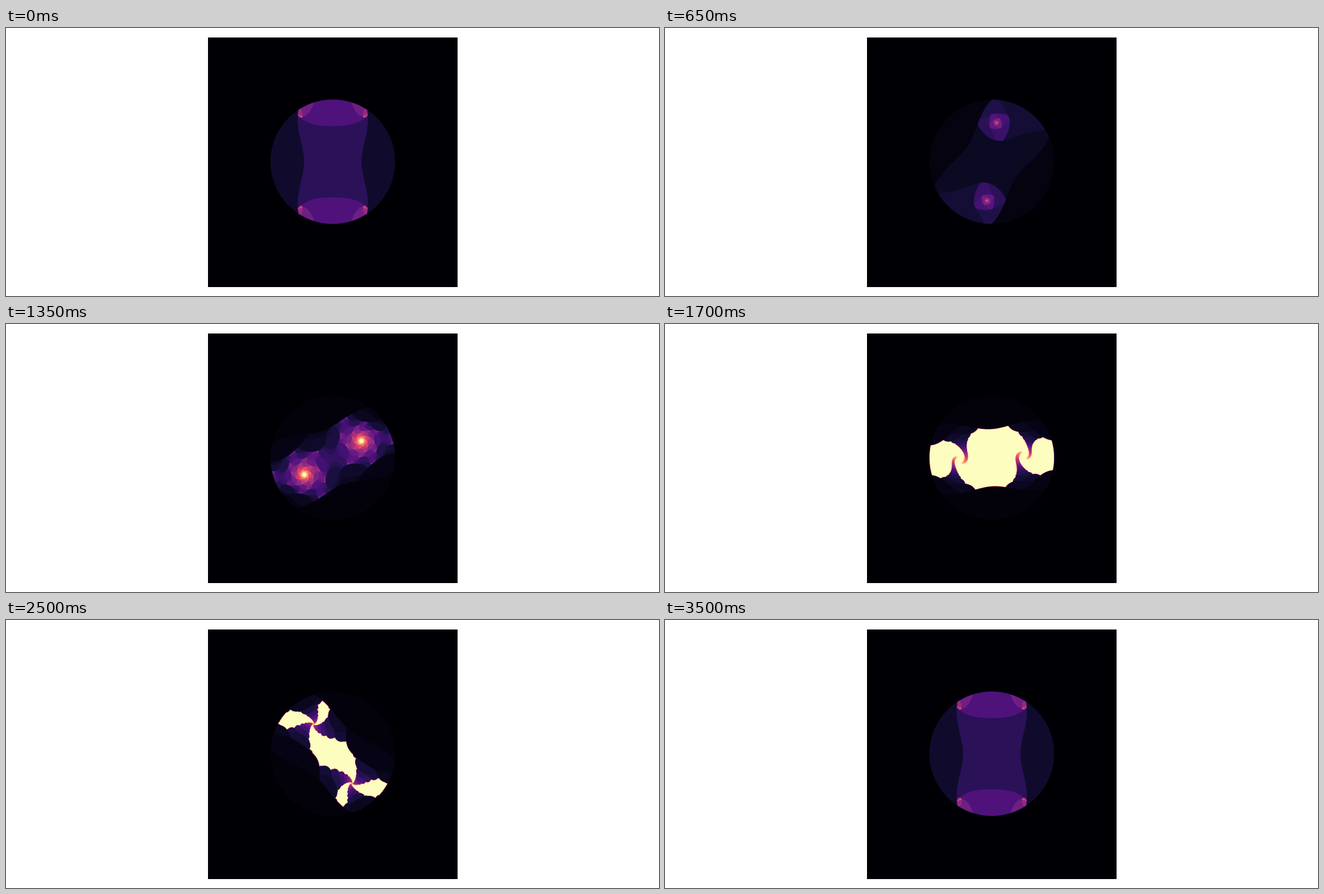
These frames come from a looping animation (1167 px wide and 480 px high, 3550 ms). An HTML page with a canvas:

```html
<!DOCTYPE html>
<html lang="en">
<head>
<meta charset="utf-8">
<title>Julia sets</title>
<style>
html, body { margin: 0; width: 100%; height: 100%; overflow: hidden; background: #fff; }
canvas { position: absolute; left: 361px; top: 17px; background: #000004; }
</style>
</head>
<body>
<canvas width="446" height="447"></canvas>
<script>
const STEP = 50, FRAMES = 71;
const RADIUS = 0.7885;         // c runs round a circle of this radius
const LIMIT = 50;              // most iterations per point
const SPACING = 0.002;         // distance of grid points in the plane
const REACH = 520;             // grid points on each side of the origin
const WIDTH = 2 * REACH + 1;
const RATIO = 2001 / 446;      // grid points per pixel
const BOX = 228;               // side of the redrawn square, in pixels
const CENTRE = { x: 223, y: 222.5 };
const LEFT = Math.round(CENTRE.x - BOX / 2);
const TOP = Math.round(CENTRE.y - BOX / 2);

const stops = "000004 1c1044 4f127b 812581 b5367a e55064 fb8761 fec287 fcfdbf"
  .split(" ")
  .map(hex => [16, 8, 0].map(shift => parseInt(hex, 16) >> shift & 255));
const stop = i => stops[Math.max(0, Math.min(stops.length - 1, i))];

// Smooth curve through the colour stops
function colourAt(v) {
  const k = Math.min(stops.length - 2, Math.floor(v * (stops.length - 1)));
  const f = v * (stops.length - 1) - k;
  return [0, 1, 2].map(j => {
    const [a, b, c, d] = [-1, 0, 1, 2].map(n => stop(k + n)[j]);
    return b + f / 2 * (c - a + f * (2 * a - 5 * b + 4 * c - d + f * (3 * (b - c) + d - a)));
  });
}
const palette = Array.from({ length: 256 }, (_, i) => colourAt(i / 255));

// Hann weights of the grid points around each pixel along one axis
function makeTaps(first, centre) {
  return Array.from({ length: BOX }, (_, p) => {
    const mid = (first + p + 0.5 - centre) * RATIO + REACH;
    const from = Math.ceil(mid - RATIO);
    const weights = [];
    for (let i = from; i <= mid + RATIO; i++) {
      weights.push(0.5 + 0.5 * Math.cos(Math.PI * (i - mid) / RATIO));
    }
    const sum = weights.reduce((a, b) => a + b);
    return { from, weights: weights.map(w => w / sum) };
  });
}
const tapsX = makeTaps(LEFT, CENTRE.x);
const tapsY = makeTaps(TOP, CENTRE.y);

function sample(data, offset, stride, tap) {
  const { from, weights } = tap;
  let v = 0;
  for (let i = 0; i < weights.length; i++) {
    v += weights[i] * data[offset + (from + i) * stride];
  }
  return v;
}

const ctx = document.querySelector("canvas").getContext("2d");
const counts = new Uint8Array(WIDTH * WIDTH);
const rows = new Float32Array(WIDTH * BOX);

function escapeCount(x, y, cx, cy) {
  let n = 0;
  while (n < LIMIT) {
    const xx = x * x, yy = y * y;
    if (xx + yy > 1) break;
    y = 2 * x * y + cy;
    x = xx - yy + cx;
    n++;
  }
  return n;
}

// Fills the grid, using the symmetry z -> -z, and returns the highest count
function iterate(cx, cy) {
  const last = counts.length - 1;
  let peak = 1;
  for (let j = 0; j <= REACH; j++) {
    for (let i = 0; i < WIDTH; i++) {
      const n = escapeCount((i - REACH) * SPACING, (j - REACH) * SPACING, cx, cy);
      const k = j * WIDTH + i;
      counts[k] = counts[last - k] = n;
      if (n > peak) peak = n;
    }
  }
  return peak;
}

function render(frame) {
  const angle = 2 * Math.PI * frame / (FRAMES - 1);
  const peak = iterate(RADIUS * Math.cos(angle), RADIUS * Math.sin(angle));
  const image = ctx.createImageData(BOX, BOX);
  for (let j = 0; j < WIDTH; j++) {
    for (let p = 0; p < BOX; p++) {
      rows[j * BOX + p] = sample(counts, j * WIDTH, 1, tapsX[p]);
    }
  }
  for (let q = 0; q < BOX; q++) {
    for (let p = 0; p < BOX; p++) {
      const v = sample(rows, p, BOX, tapsY[q]) / peak;
      const k = 4 * (q * BOX + p);
      image.data.set(palette[Math.min(255, Math.floor(v * 256 + 1e-4))], k);
      image.data[k + 3] = 255;
    }
  }
  return image;
}

const images = [];
const start = performance.now();
let shown = -1;

function tick() {
  const t = Math.max(0, performance.now() - start);
  const frame = Math.floor(t / STEP) % FRAMES;
  if (frame !== shown) {
    images[frame] ??= render(frame);
    ctx.putImageData(images[frame], LEFT, TOP);
    shown = frame;
  }
  requestAnimationFrame(tick);
}
tick();
</script>
</body>
</html>
```
